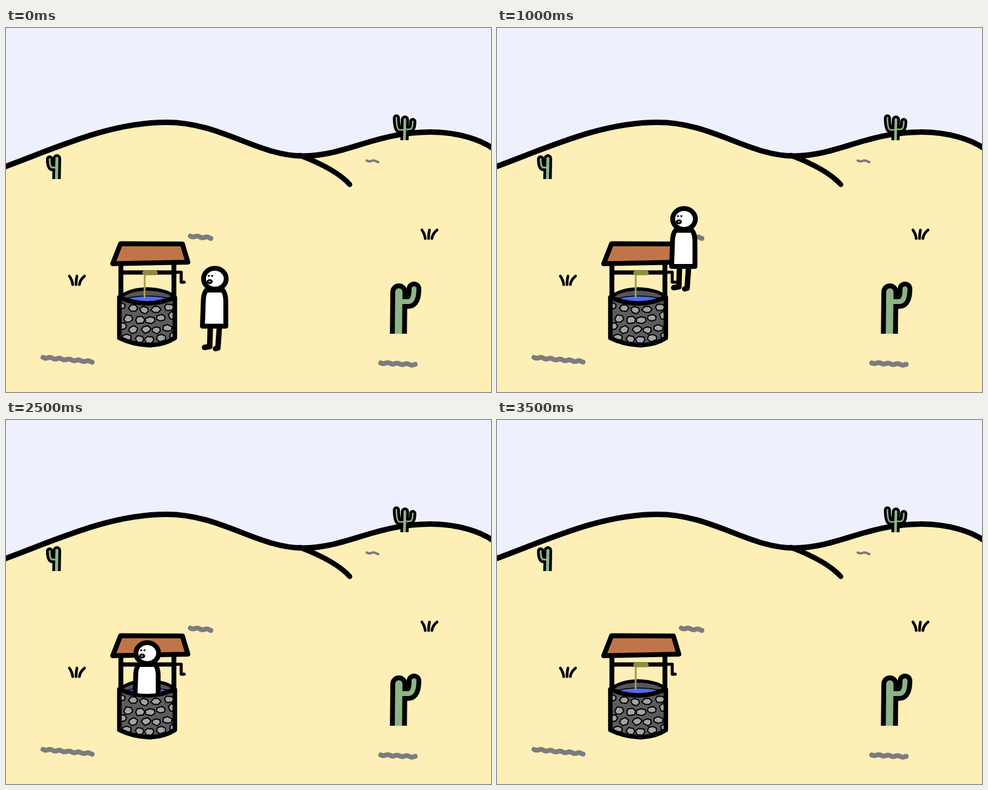
An HTML page with a canvas that plays this animation: 800x600 px, repeating every 5.5 s.

```html
<!DOCTYPE html>
<html lang="en">
<head>
<meta charset="utf-8">
<title>Desert well</title>
<style>
html, body { margin: 0; width: 100%; height: 100%; overflow: hidden; background: #feefb7; }
canvas { display: block; width: 100vw; height: 100vh; }
</style>
</head>
<body>
<canvas id="stage" width="800" height="600"></canvas>
<script>
const ctx = document.getElementById('stage').getContext('2d');
const LOOP = 5500, STEP = 500;
const INK = '#000', GREEN = '#8db487', GREY = '#7c7c7f', SAND = '#feefb7';

// Head centre for each half-second pose; afterwards the figure is gone.
const POSES = [[344.5, 413], [332, 363.5], [308.5, 314.5], [267, 302], [241, 326], [233, 384], [233, 434]];
const FIRST_INSIDE = 4;

function shape(d, fill, stroke, width) {
  const path = new Path2D(d);
  if (fill) { ctx.fillStyle = fill; ctx.fill(path); }
  if (stroke) { ctx.strokeStyle = stroke; ctx.lineWidth = width; ctx.stroke(path); }
}
const line = (d, width, color = INK) => shape(d, null, color, width);

function disc(x, y, rx, ry, fill, width) {
  ctx.beginPath();
  ctx.ellipse(x, y, rx, ry, 0, 0, Math.PI * 2);
  ctx.fillStyle = fill;
  ctx.fill();
  if (width) { ctx.strokeStyle = INK; ctx.lineWidth = width; ctx.stroke(); }
}

function clipped(d, draw) {
  ctx.save();
  ctx.clip(new Path2D(d));
  draw();
  ctx.restore();
}

function seeded(seed) {
  return () => (seed = (seed * 16807) % 2147483647) / 2147483647;
}

// Wavy streak in the sand.
function streak(x1, y1, x2, y2, width) {
  let d = '';
  for (let x = x1; x <= x2; x++) {
    const y = y1 + (y2 - y1) * (x - x1) / (x2 - x1) + Math.sin((x - x1) * 0.4);
    d += `${d ? 'L' : 'M'}${x},${y}`;
  }
  line(d, width, GREY);
}

function grass(x, y) {
  for (const side of [-1, 0, 1])
    line(`M${x + side * 5.5},${y}q${side},-8 ${side * 7 + 1.5},-14`, 4.5);
}

// A trunk and bent arms; each arm has a reach, a joint height and a tip height.
function cactus(x, y, height, width, ink, ...arms) {
  const limbs = [[`M${x - 1},${y + width}L${x},${y - height}`, width]];
  for (const [reach, joint, tip] of arms)
    limbs.push([`M${x},${y - joint}h${reach * 0.6}Q${x + reach},${y - joint} ${x + reach},${y - tip}`, width * 0.86]);
  clipped(`M0,0H800V${y}H0Z`, () => {
    limbs.forEach(([d, w]) => line(d, w));
    limbs.forEach(([d, w]) => line(d, w - 2 * ink, GREEN));
  });
}

const HILLS = 'M-8,231C85,197 170,155.5 265,155.5C355,155.5 415,211 490,211' +
  'C560,211 610,171.5 700,171.5C745,171.5 785,184 808,202';

function landscape() {
  ctx.fillStyle = '#eef0fe';
  ctx.fillRect(0, 0, 800, 600);
  shape(HILLS + 'V610H-8Z', SAND);
  line(HILLS, 9);
  line('M485,210Q545,233 567,258', 8.5);

  streak(61, 543, 142, 550, 8);
  streak(618, 552, 675, 555, 8);
  streak(304, 343, 338, 346, 8);
  streak(595, 218.5, 614, 220, 4);
  grass(115.5, 423);
  grass(697, 347);

  cactus(84, 249, 34, 14, 4.5, [-12, 19, 33]);
  cactus(658, 185, 34, 13.5, 4.5, [-14, 17, 37], [13, 18, 31]);
  cactus(648, 504, 69, 28, 8, [25, 53, 74]);
}

const RIM = 'M187,444Q233,464 278.5,444';
const WALL = RIM + 'V511Q262,522 237,523Q209,522 187,511Z';

function stones() {
  const random = seeded(11);
  const jitter = size => (random() - 0.5) * size;
  for (let row = 0; row < 4; row++) {
    for (let col = 0; col < 5; col++) {
      const x = 196 + col * 19 + (row % 2) * 9 - 5 + jitter(4);
      const y = 464 + row * 16.5 - 6 * ((x - 233) / 46) ** 2 + jitter(4);
      const turn = random() * 6;
      ctx.beginPath();
      for (let a = 0; a < 6; a++) {
        const k = 1 + jitter(0.3);
        ctx.lineTo(x + 8 * k * Math.cos(a + turn), y + 6 * k * Math.sin(a + turn));
      }
      ctx.closePath();
      ctx.fillStyle = '#a3a3a3';
      ctx.fill();
      ctx.strokeStyle = INK;
      ctx.lineWidth = 2;
      ctx.stroke();
    }
  }
}

function well() {
  // Opening and water
  shape('M188,444Q202,431 233,430Q264,431 278,443Q233,464 188,444Z', '#565658', INK, 5.5);
  shape('M196,446Q231,438 267,445Q233,460 196,446Z', '#526bf5', INK, 1.5);
  line('M229,402L228.5,444', 3, '#a39d4c');

  shape(WALL, '#5d5d5f');
  clipped(WALL, stones);
  line(WALL, 7.5);

  // Frame, winch and roof
  line('M189.5,386V443M277,386V443', 8);
  line('M190,403H279', 7);
  line('M279,402.5H289V419H294', 5);
  line('M229,403.5H246', 8, '#918b3e');
  shape('M189,355.5L291,356L300,386L176,388.5Z', '#c07549', INK, 8);
}

// Coordinates are relative to the head centre.
function figure([x, y]) {
  ctx.save();
  ctx.translate(x, y);
  line('M-7.5,80L-8.5,112L-17,113.5M7.5,80L5,114.5L1,115.5', 9);
  shape('M-14,19Q-19,25-19,37L-20.5,78.5H18V37Q18,25 13,19Z', '#fff', INK, 8);
  disc(0, 0.3, 18.7, 17.3, '#fff', 8);
  disc(-10, -4.5, 1.8, 1.6, INK);
  disc(-4.5, -4.5, 1.8, 1.6, INK);
  disc(-8.5, 5, 3.5, 2.5, '#bbb', 3);
  ctx.restore();
}

function render(ms) {
  const step = Math.floor(ms / STEP), pose = POSES[step];
  landscape();
  well();
  if (!pose) return;
  if (step < FIRST_INSIDE) return figure(pose);
  clipped(RIM + 'H800V0H0V444Z', () => figure(pose));
  line(RIM, 5);
}

ctx.lineCap = ctx.lineJoin = 'round';
const start = performance.now();
function tick() {
  render((performance.now() - start) % LOOP);
  requestAnimationFrame(tick);
}
tick();
</script>
</body>
</html>
```
